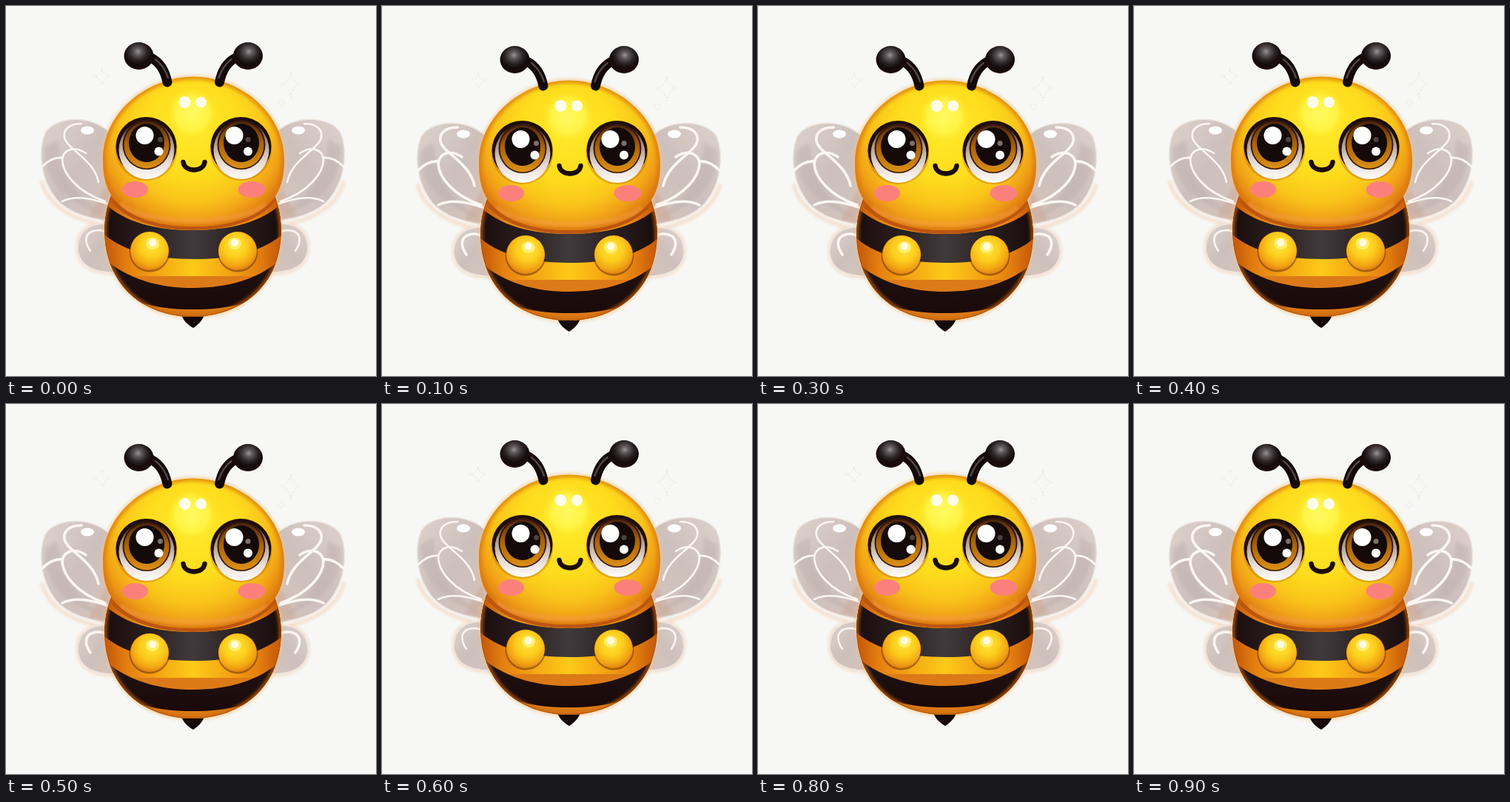
These frames come from a looping animation (500x500 px, 1000 ms). An HTML page:

```html
<!DOCTYPE html>
<html lang="en">
<head>
<meta charset="utf-8">
<title>Bee</title>
<style>
html, body { margin: 0; width: 100%; height: 100%; overflow: hidden; background: #f7f8f5; }
svg { display: block; width: 100%; height: 100%; }
</style>
</head>
<body>
<svg viewBox="0 0 500 500">
  <defs>
    <radialGradient id="headFill" gradientUnits="userSpaceOnUse" cx="252" cy="165" r="146">
      <stop offset="0" stop-color="#ffe929"/>
      <stop offset=".45" stop-color="#fedc1d"/>
      <stop offset=".68" stop-color="#f9c41a"/>
      <stop offset=".84" stop-color="#f1a217"/>
      <stop offset="1" stop-color="#dc7513"/>
    </radialGradient>
    <radialGradient id="glow">
      <stop offset="0" stop-color="#fffa62"/>
      <stop offset=".65" stop-color="#fff64a" stop-opacity=".85"/>
      <stop offset="1" stop-color="#ffec30" stop-opacity="0"/>
    </radialGradient>
    <linearGradient id="bodyFill">
      <stop offset="0" stop-color="#c4570b"/>
      <stop offset=".13" stop-color="#e4800f"/>
      <stop offset=".3" stop-color="#f4a513"/>
      <stop offset=".5" stop-color="#fdca19"/>
      <stop offset=".7" stop-color="#f4a513"/>
      <stop offset=".87" stop-color="#e4800f"/>
      <stop offset="1" stop-color="#c4570b"/>
    </linearGradient>
    <linearGradient id="stripeFill">
      <stop offset="0" stop-color="#1a0a09"/>
      <stop offset=".28" stop-color="#2a2021"/>
      <stop offset=".5" stop-color="#413a3c"/>
      <stop offset=".75" stop-color="#281e1f"/>
      <stop offset="1" stop-color="#160807"/>
    </linearGradient>
    <linearGradient id="lowStripeFill" x2="0" y2="1">
      <stop offset="0" stop-color="#211617"/>
      <stop offset="1" stop-color="#1a0908"/>
    </linearGradient>
    <radialGradient id="armFill" cx=".56" cy=".36" r=".68">
      <stop offset="0" stop-color="#ffe63c"/>
      <stop offset=".45" stop-color="#fccd1c"/>
      <stop offset=".78" stop-color="#f2a414"/>
      <stop offset="1" stop-color="#dc7811"/>
    </radialGradient>
    <radialGradient id="ballFill" cx=".47" cy=".34" r=".62">
      <stop offset="0" stop-color="#9b9496"/>
      <stop offset=".2" stop-color="#615a5c"/>
      <stop offset=".5" stop-color="#2b2325"/>
      <stop offset=".75" stop-color="#140b0c"/>
      <stop offset="1" stop-color="#1c0b0b"/>
    </radialGradient>
    <linearGradient id="whiteFill" x2="0" y2="1">
      <stop offset="0" stop-color="#4b2410"/>
      <stop offset=".35" stop-color="#ab9585"/>
      <stop offset=".7" stop-color="#e6dad2"/>
      <stop offset="1" stop-color="#fffdfa"/>
    </linearGradient>
    <linearGradient id="irisFill" x2="0" y2="1">
      <stop offset="0" stop-color="#51270a"/>
      <stop offset=".45" stop-color="#a7620c"/>
      <stop offset="1" stop-color="#dc9013"/>
    </linearGradient>
    <linearGradient id="wingFill" x1="0" y1="0" x2="1" y2="1">
      <stop offset="0" stop-color="#ddd2cb"/>
      <stop offset=".5" stop-color="#cdc0bc"/>
      <stop offset="1" stop-color="#d5c4bb"/>
    </linearGradient>
    <filter id="soft" x="-20%" y="-20%" width="140%" height="140%"><feGaussianBlur stdDeviation="2.2"/></filter>
    <path id="bodyShape" d="M143 254C128 290 131 332 147 362C168 402 210 420 252 420C294 420 336 402 358 362C374 332 377 290 362 254Z"/>
    <path id="headShape" d="M253 95.500C194 95.500 131 141 131 208C131 232 136 249 147 262C167 286 205 298 253 298C301 298 340 286 360 262C371 249 376 232 376 208C376 141 312 95.500 253 95.500Z"/>
    <clipPath id="bodyClip"><use href="#bodyShape"/></clipPath>
    <clipPath id="headClip"><use href="#headShape"/></clipPath>

    <g id="wing">
      <path d="M48 236C57 272 92 290 140 298C110 291 96 306 97 328C98 352 119 362 147 361" fill="none" stroke="#f4d9c4" stroke-width="4" filter="url(#soft)"/>
      <g fill="url(#wingFill)" stroke="#eee5df" stroke-width="1.500">
        <path d="M142 295C110 291 97 307 97 328C99 351 119 361 150 360Z"/>
        <path d="M139 170C116 147 68 148 53 171C43 195 46 234 68 261C86 281 110 286 145 292Z"/>
      </g>
      <path d="M52 190C50 230 72 262 132 282C92 253 72 228 70 180Z" fill="#bbadab" opacity=".45" filter="url(#soft)"/>
      <path d="M142 230V290L112 284Z" fill="#c99f8c" opacity=".4" filter="url(#soft)"/>
      <g class="veins" fill="none" stroke="#fbf6f1" stroke-linecap="round">
        <path d="M102 159C84 159 77 168 79 178C83 194 119 207 125 238"/>
        <path d="M108 199C92 188 78 194 76 207C76 226 96 251 134 264"/>
        <path d="M49 217C57 209 66 204 76 205"/>
        <path d="M76 264C92 256 112 259 136 267"/>
        <path d="M114 331C105 318 107 307 118 304C125 302 131 303 137 307"/>
      </g>
      <ellipse cx="110" cy="168" rx="9" ry="5.500" fill="#fff"/>
    </g>

    <g id="antenna">
      <path d="M196 70C208 76 215 88 218 103" fill="none" stroke="#150a0a" stroke-width="13" stroke-linecap="round"/>
      <path d="M202 72C211 79 216 88 219 97" fill="none" stroke="#6a5f61" stroke-width="2.500" stroke-linecap="round" opacity=".7"/>
      <ellipse cx="179.500" cy="67.500" rx="20" ry="18.500" fill="url(#ballFill)"/>
    </g>

    <g id="eye">
      <ellipse cy="193" rx="42" ry="43" fill="#bd610c" opacity=".4"/>
      <ellipse cy="190" rx="41" ry="40" fill="#1f0d08"/>
      <ellipse cx=".5" cy="194.500" rx="37.500" ry="39.500" fill="url(#whiteFill)"/>
      <ellipse cx=".5" cy="187.500" rx="32.500" ry="33.500" fill="#36190b"/>
      <ellipse cx=".5" cy="188" rx="30.500" ry="31.500" fill="url(#irisFill)"/>
      <ellipse cx=".5" cy="185" rx="24" ry="26" fill="#140a09"/>
    </g>

    <g id="arm">
      <circle cy="332" r="27.500" fill="#5c2406" opacity=".5"/>
      <circle cy="331" r="26" fill="url(#armFill)"/>
      <ellipse cx="4" cy="321" rx="9" ry="8" fill="#fff27c" opacity=".8"/>
      <circle cx="4" cy="320" r="5" fill="#fffbe2"/>
    </g>
  </defs>

  <rect width="500" height="500" fill="#f7f8f5"/>
  <g id="bee">
    <g fill="none" stroke="#e7e8e5" stroke-dasharray="3 2">
      <path d="M130 84Q131 94 141 95Q132 97 130 107Q128 97 118 95Q129 94 130 84Z"/>
      <path d="M385 89Q387 104 398 106Q387 108 385 124Q382 108 371 106Q382 104 385 89Z"/>
      <circle cx="372" cy="131" r="4"/>
    </g>

    <use href="#wing"/>
    <use href="#wing" transform="matrix(-1 0 0 1 505 0)"/>

    <g fill="none" stroke="#f3c386" stroke-width="5" opacity=".6" filter="url(#soft)">
      <use href="#bodyShape"/>
      <use href="#headShape"/>
    </g>

    <path d="M237 417H268C266 425 258 432 253 435C247 432 239 425 237 417Z" fill="#150a0a"/>

    <use href="#bodyShape" fill="url(#bodyFill)"/>
    <g clip-path="url(#bodyClip)">
      <path d="M125 258C152 290 197 303 253 303C309 303 354 290 381 258V302C350 332 307 342 253 342C199 342 156 332 125 302Z" fill="url(#stripeFill)"/>
      <path d="M125 365H381V425H125Z" fill="#dc7a17"/>
      <path d="M125 334C157 366 200 381 253 381C306 381 349 366 381 334V368C347 401 301 410 253 410C205 410 159 401 125 368Z" fill="url(#lowStripeFill)"/>
      <path d="M138 256C162 289 208 300 253 300C298 300 343 289 367 256" fill="none" stroke="#bd560f" stroke-width="6"/>
      <use href="#bodyShape" fill="none" stroke="#c8640f" stroke-width="6" opacity=".75" filter="url(#soft)"/>
      <use href="#bodyShape" fill="none" stroke="#8e3a0b" stroke-width="2" opacity=".45"/>
    </g>

    <use href="#headShape" fill="url(#headFill)"/>
    <g clip-path="url(#headClip)">
      <use href="#headShape" fill="none" stroke="#d9780f" stroke-width="8" opacity=".7" filter="url(#soft)"/>
      <path d="M155 267C185 298 321 298 351 267" fill="none" stroke="#f5a046" stroke-width="6" opacity=".6" filter="url(#soft)"/>
    </g>
    <circle cx="251" cy="145" r="34" fill="url(#glow)"/>
    <g fill="#fffde9">
      <circle cx="241.500" cy="130" r="8"/>
      <circle cx="263.500" cy="130" r="7.500"/>
    </g>

    <use href="#antenna"/>
    <use href="#antenna" transform="matrix(-1 0 0 1 506.500 0)"/>

    <use href="#eye" x="189.500"/>
    <use href="#eye" x="317.500"/>
    <g fill="#fff">
      <circle cx="187.500" cy="175" r="12"/>
      <circle cx="206.500" cy="196.500" r="6"/>
      <circle cx="308.500" cy="175" r="12"/>
      <circle cx="327" cy="196.500" r="6"/>
    </g>
    <g id="glints" fill="#b5a8a2">
      <circle cx="208.500" cy="180.500" r="3.500"/>
      <circle cx="327" cy="180.500" r="3.500"/>
    </g>

    <path d="M239.500 211C241 225 267 225 268.500 211" fill="none" stroke="#1b0c08" stroke-width="6.500" stroke-linecap="round"/>
    <g fill="#fb807c">
      <ellipse cx="174.500" cy="248" rx="17.500" ry="11"/>
      <ellipse cx="332" cy="248" rx="18.500" ry="11"/>
    </g>

    <use href="#arm" x="194"/>
    <use href="#arm" transform="matrix(-1 0 0 1 313 0)"/>
  </g>
</svg>
<script>
const STEP = 100, LOOP = 1000;
const bee = document.getElementById("bee");
const glints = document.getElementById("glints");
const veins = document.querySelector(".veins");

// The bee hovers between two heights with hard steps.
function draw(time) {
  const low = Math.floor((time % LOOP) / STEP) % 2;
  bee.setAttribute("transform", `translate(0 ${low * 5})`);
  veins.setAttribute("stroke-width", low ? 3.6 : 2.6);
  glints.setAttribute("opacity", low ? 0.65 : 0.35);
}

const start = performance.now();
function tick() {
  draw(performance.now() - start);
  requestAnimationFrame(tick);
}
draw(0);
requestAnimationFrame(tick);
</script>
</body>
</html>
```
